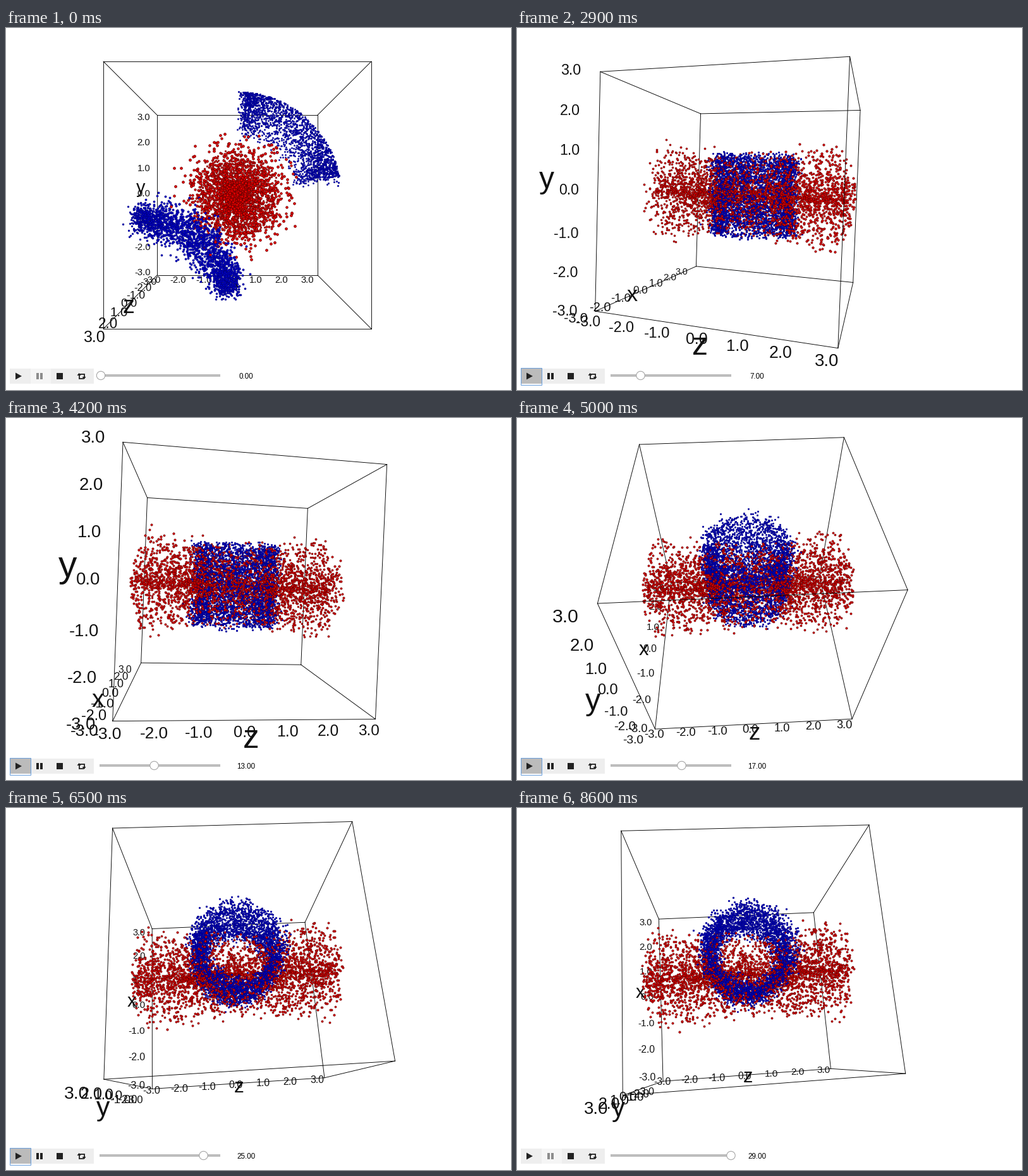
A matplotlib script that plays this animation: 799 px wide and 574 px high, repeating every 8.8 s.

```python
import itertools

import matplotlib.pyplot as plt
import numpy as np
from matplotlib.animation import FuncAnimation
from matplotlib.patches import Circle, Polygon, Rectangle

W, H, DPI = 799, 574, 64
STEP, FRAMES = 100, 88
CENTER = np.array([366, 265])
FOCAL, DIST = 636, 2
UNITS = 6.18            # data units across the unit box
SPHERE = 0.516
N = 2000                # points per half of the blue cloud
STEPS = 30
rng = np.random.default_rng(7)


# ---------- camera ----------
# Each pose lists the x, y and z axes in (right, up, toward viewer).
POSES = np.array([
    [[1, 0, 0], [0, 1, 0], [0, 0, 1]],
    [[.303, .020, -.949], [.033, .998, .031], [.954, -.041, .296]],
    [[-.133, .017, -.993], [.040, .996, .013], [.994, -.039, -.139]],
    [[-.036, .853, -.522], [-.032, .522, .854], [.998, .047, .008]],
    [[-.070, .972, -.204], [.069, .209, .972], [.994, .054, -.083]],
])
POSE_TIMES = [2100, 2200, 2300, 2900, 3300, 4100, 4300, 5000, 5600, 6000, 6700]
POSE_STOPS = [0, .5, .8, 1, 1.1, 2, 2, 2.8, 3, 3, 4]


def camera(t):
    stop = np.interp(t, POSE_TIMES, POSE_STOPS)
    k = min(int(stop), len(POSES) - 2)
    mix = POSES[k] + (stop - k) * (POSES[k + 1] - POSES[k])
    u, _, vt = np.linalg.svd(mix)
    return u @ vt


def project(points, rot, shift=(0, 0)):
    cam = np.atleast_2d(points) @ rot
    depth = DIST - cam[:, 2]
    x = CENTER[0] + FOCAL * (cam[:, 0] + shift[0]) / depth
    y = CENTER[1] - FOCAL * (cam[:, 1] + shift[1]) / depth
    return x, y, depth


# ---------- point clouds ----------
def red_cloud(n=3300):
    z = rng.uniform(-SPHERE, SPHERE, n)
    reach = .205 + .085 * (z / SPHERE) ** 2
    r = reach * rng.uniform(0, 1, n) * (1 + .08 * rng.normal(size=n))
    a = rng.uniform(0, 2 * np.pi, n)
    pts = np.column_stack([r * np.cos(a), r * np.sin(a), z])
    return pts[np.hypot(r, z) < SPHERE]


def on_sphere(x, y, side):
    """Points of the sphere seen at stage position x, y from the front."""
    d = np.column_stack([(x - CENTER[0]) / FOCAL, (CENTER[1] - y) / FOCAL,
                         -np.ones_like(x)])
    q = (d ** 2).sum(1)
    root = np.sqrt(np.maximum(4 - q * (4 - SPHERE ** 2), 0))
    return np.array([0, 0, DIST]) + ((2 + side * root) / q)[:, None] * d


def blue_start(u):
    s = .5 - .5 * np.cos(np.pi * u)
    a, b = s[:N], s[N:]
    spread = 9 + 9 * np.sqrt(np.sin(np.pi * a))
    bend = lambda p, q, r: (1 - a) ** 2 * p + 2 * a * (1 - a) * q + a ** 2 * r
    ax = bend(215, 320, 350) + spread * rng.normal(size=N)
    ay = bend(302, 312, 408) + spread * rng.normal(size=N)
    ay = np.minimum(ay, 430)
    front = on_sphere(ax, ay, -1)
    angle = np.radians(13 + 72 * b + 2.5 * rng.normal(size=N))
    r = 85 + 79 * np.sqrt(rng.uniform(0, 1, N))
    back = on_sphere(CENTER[0] + r * np.cos(angle),
                     CENTER[1] - r * np.sin(angle), 1)
    return np.vstack([front, back])


def blue_steps(u):
    """Noisy ring around the y axis that jitters from step to step."""
    angle = np.pi * u + np.repeat([np.pi / 2, -np.pi / 2], N)
    phase = rng.uniform(0, 2 * np.pi, 2 * N)
    noise = rng.normal(size=2 * N)
    steps = []
    for _ in range(STEPS):
        r = .193 + .023 * noise
        y = .205 * 2 / np.pi * np.arcsin(np.sin(phase))
        y = y + .008 * rng.normal(size=2 * N)
        steps.append(np.column_stack(
            [.1 + r * np.cos(angle), y, r * np.sin(angle)]))
        angle = angle + .06 * rng.normal(size=2 * N)
        phase = phase + .12 * rng.normal(size=2 * N)
        noise = .85 * noise + .527 * rng.normal(size=2 * N)
    return steps


RED = red_cloud()
along = rng.uniform(0, 1, 2 * N)
START, RING = blue_start(along), blue_steps(along)


def blue_cloud(t):
    p = np.clip((t - 1500) / 200 - .4, 0, STEPS - 1)
    k = min(int(p), STEPS - 2)
    ring = RING[k] + (p - k) * (RING[k + 1] - RING[k])
    rest = max(0, 1 - p / 2.4) ** 1.4
    return ring + rest * (START - ring)


# ---------- stage ----------
fig = plt.figure(figsize=(W / DPI, H / DPI), dpi=DPI, facecolor="white")
ax = fig.add_axes([0, 0, 1, 1])
ax.set(xlim=(0, W), ylim=(H, 0))
ax.axis("off")


def pt(px):
    return px * 72 / DPI


SLICES = np.linspace(1.4, 2.6, 25)


def point_layers(face, edge, size, lift):
    layers = []
    for near, far in zip(SLICES[:-1], SLICES[1:]):
        mid = (near + far) / 2
        layers += ax.plot([], [], "o", mfc=face, mec=edge, mew=pt(.6),
                          ms=pt(size / mid), zorder=lift - mid)
    return layers


clouds = [(point_layers("#0000d0", "#000078", 5.0, 0), blue_cloud),
          (point_layers("#dc0000", "#600000", 6.2, .001), lambda t: RED)]

corners = np.array(list(itertools.product([-.5, .5], repeat=3)))
EDGES = [(a, b) for a, b in itertools.combinations(corners, 2)
         if abs(a - b).sum() == 1]
edge_lines = [ax.plot([], [], color="black", lw=pt(.9))[0] for _ in EDGES]


# Per axis: outward displacement, then sprite shift of ticks and of the letter.
TICK_OUT = [(0, .05, .05), (.05, 0, .05), (.02, .05, 0)]
TICK_SHIFT = [(-.043, .012), (-.043, .012), (-.02, .015)]
NAME_OUT = [(0, .13, .13), (.135, 0, .135), (.04, .08, 0)]
NAME_SHIFT = [(-.018, .052), (0, .032), (0, .022)]
GLYPH_MIDDLE = {"x": .26, "y": .16, "z": .26}


def make_label(text, axis, value, out, shift, em, middle):
    place = -.5 - np.array(out, float)
    place[axis] = value / UNITS
    art = ax.text(0, 0, text, family="Liberation Sans", color="#111111",
                  ha="center", va="baseline")
    return art, place, shift, em, middle


labels = []
for i, name in enumerate("xyz"):
    for v in range(-3, 4):
        dx, dy = TICK_SHIFT[i]
        if v < 0:
            dx, dy = dx - .008, dy - (.016 if i == 1 else 0)
        labels.append(make_label(f"{v:.1f}", i, v, TICK_OUT[i], (dx, dy),
                                 .0594, .35))
    labels.append(make_label(name, i, 0, NAME_OUT[i], NAME_SHIFT[i],
                             .119, GLYPH_MIDDLE[name]))


# ---------- player controls ----------
def box(x0, y0, x1, y1, color, z=10, **kw):
    kw = {"lw": 0, **kw}
    return ax.add_patch(Rectangle((x0, y0), x1 - x0, y1 - y0, fc=color,
                                  zorder=z, **kw))


ICON = "#222222"
hover = box(5, 541, 39, 566, "#c4c4c4", 9)
play_back = box(6, 540, 38.5, 564, "#eeeeee")
pause_back = box(38.5, 540, 71, 564, "#eeeeee")
box(71, 540, 139, 564, "#eeeeee")
focus = box(5.5, 538.5, 38.5, 565.5, "none", 11, ec="#6a9fdc", lw=pt(1))
ax.add_patch(Polygon([(15, 546.5), (15, 557.5), (25, 552)], fc=ICON, zorder=12))
pause_bars = [box(x, 547, x + 4, 557, ICON, 12) for x in (47.5, 53.5)]
box(80, 547, 90, 557, ICON, 12)
for sign in (1, -1):
    xs = 119.5 + sign * np.array([-4, -4, 2.5])
    ys = 552 + sign * np.array([-2.5, 3.5, 3.5])
    ax.plot(xs, ys, color=ICON, lw=pt(1.8), zorder=12,
            solid_joinstyle="miter")
    tip = [(-7, -1), (-1, -1), (-4, -5)]
    ax.add_patch(Polygon([(119.5 + sign * x, 552 + sign * y) for x, y in tip],
                         fc=ICON, zorder=12))

box(148, 549, 339, 553, "#bdbdbd")
knob = ax.add_patch(Circle((150, 551), 6.7, fc="white", ec="#9e9e9e",
                           lw=pt(1), zorder=12))
readout = ax.text(380, 556, "", family="Liberation Sans", fontsize=pt(11.6),
                  color="black", ha="center", va="baseline", zorder=12)


def draw_controls(t):
    playing = 1500 <= t < 7600
    value = int(np.clip((t - 1500) // 200, 0, STEPS - 1))
    knob.center = (150 + 6.5 * value, 551)
    readout.set_text(f"{value:.2f}")
    hover.set_visible(1100 <= t < 1300)
    focus.set_visible(1300 <= t < 8600)
    pressed = 1300 <= t < 7600
    play_back.set_facecolor("#bbbbbb" if pressed else "#eeeeee")
    pause_back.set_facecolor("#eeeeee" if playing else "#f5f5f5")
    for bar in pause_bars:
        bar.set_facecolor(ICON if playing else "#8c8c8c")


def draw_scene(t):
    rot = camera(t)
    for layers, cloud in clouds:
        x, y, depth = project(cloud(t), rot)
        layer_of = np.clip(np.digitize(depth, SLICES) - 1, 0, len(layers) - 1)
        for k, layer in enumerate(layers):
            inside = layer_of == k
            layer.set_data(x[inside], y[inside])
    for line, ends in zip(edge_lines, EDGES):
        x, y, depth = project(ends, rot)
        line.set_data(x, y)
        line.set_zorder(-depth.mean())
    for art, place, shift, em, middle in labels:
        x, y, depth = (v[0] for v in project(place, rot, shift))
        size = em * FOCAL / depth
        art.set_position((x, y + middle * size))
        art.set_fontsize(pt(size))
        art.set_zorder(-depth)


def update(frame):
    t = frame * STEP
    draw_scene(t)
    draw_controls(t)
    return []


anim = FuncAnimation(fig, update, frames=FRAMES, interval=STEP, repeat=True,
                     repeat_delay=0, blit=False)
plt.show()
```
